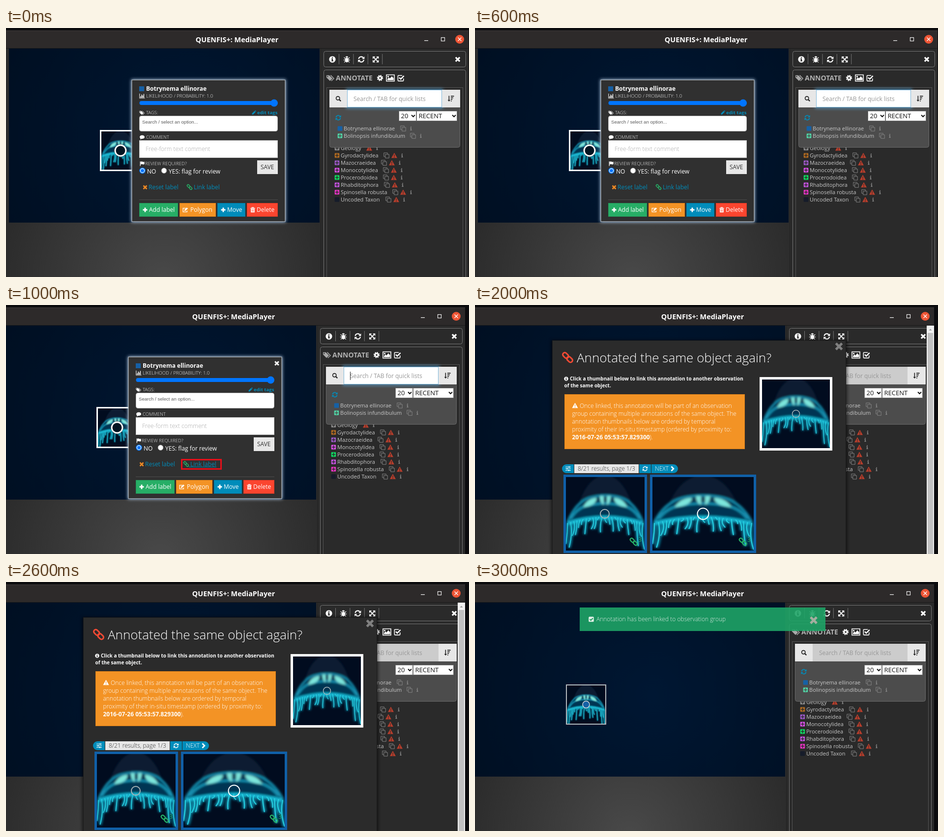
These frames come from a looping animation (942 by 508 pixels, 4000 ms). An HTML page:

```html
<!DOCTYPE html>
<html lang="en">
<head>
<meta charset="utf-8">
<title>Annotation player</title>
<style>
html, body { margin: 0; width: 100%; height: 100%; overflow: hidden; background: #0c0c0e; }
#stage { display: block; width: 942px; height: 508px; font-family: "Open Sans", sans-serif; }
</style>
</head>
<body>
<svg id="stage" viewBox="0 0 942 508">
  <defs>
    <radialGradient id="sea" gradientUnits="userSpaceOnUse" cx="360" cy="230" r="400">
      <stop offset="0" stop-color="#001733"/><stop offset="1" stop-color="#000f22"/>
    </radialGradient>
    <radialGradient id="floor" gradientUnits="userSpaceOnUse" cx="315" cy="515" r="330">
      <stop offset="0" stop-color="#494949"/><stop offset="1" stop-color="#2c2c2c"/>
    </radialGradient>
    <radialGradient id="side" gradientUnits="userSpaceOnUse" r="1" gradientTransform="translate(784 515) scale(212 660)">
      <stop offset="0" stop-color="#454545"/><stop offset="1" stop-color="#2a2a2a"/>
    </radialGradient>
    <filter id="blur" x="-20%" y="-20%" width="140%" height="140%"><feGaussianBlur stdDeviation="3"/></filter>
    <filter id="soft"><feGaussianBlur stdDeviation="1.4"/></filter>
  </defs>
  <g id="win"></g>
</svg>
<script>
const BLUE = '#008cba', GREEN = '#27ae66', ORANGE = '#f39325', SWATCH = '#1660a5', CHIP = '#e7e7e7';

const rect = (x, y, w, h, fill, more = '') =>
  `<rect x="${x}" y="${y}" width="${w}" height="${h}" fill="${fill}" ${more}/>`;
const frame = (x, y, w, h, color, sw = 1, more = '') =>
  rect(x, y, w, h, 'none', `stroke="${color}" stroke-width="${sw}" ${more}`);
const text = (x, y, s, size, fill = '#fff', weight = 400, more = '') =>
  `<text x="${x}" y="${y}" font-size="${size}" fill="${fill}" font-weight="${weight}" ${more}>${s}</text>`;
const path = (d, more = '') => `<path d="${d}" ${more}/>`;
const line = (d, w = 2) => path(d, `fill="none" stroke="currentColor" stroke-width="${w}"`);
const ring = (x, y, r, color, w, fill = 'none') =>
  `<circle cx="${x}" cy="${y}" r="${r}" fill="${fill}" stroke="${color}" stroke-width="${w}"/>`;
const on = (steps, ...parts) => `<g data-on="${steps}">${parts.join('')}</g>`;

// Icons live in a 16 unit box around 0,0
const hole = 'fill-rule="evenodd"';
const icons = {
  info: path('M0-7.5a7.5 7.5 0 1 0 .01 0zM-1.3-5.2h2.6v2.2h-2.6zM-2.2-1.8h3.5v4.7h1v1.8h-4.6v-1.8h1v-2.9h-.9z', hole),
  i: path('M-1.5-7h3v3h-3zM-3-2.5h4.5v7.5h1.5v2h-6v-2h1.5v-5.5h-1.5z'),
  bug: '<ellipse cy="1.5" rx="4" ry="5.5"/><path d="M-3-4.5a3 3 0 0 1 6 0z"/>' +
    line('M-7.5 1.5H7.5M-6.5-4.5L-3-1M6.5-4.5L3-1M-6 7L-3 4M6 7L3 4', 1.5),
  refresh: line('M-6-1A6 6 0 0 1 4.5-4M6 1A6 6 0 0 1-4.5 4', 2.4) + path('M7.5-7v6h-6zM-7.5 7v-6h6z'),
  expand: line('M-5-5L5 5M5-5L-5 5', 2.2) + path('M-7-7h6l-6 6zM7-7h-6l6 6zM-7 7h6l-6-6zM7 7h-6l6-6z'),
  times: line('M-5.5-5.5L5.5 5.5M5.5-5.5L-5.5 5.5', 4.4),
  tags: path('M-8-6h6l7 7-5.5 5.5-7.5-7.5zM-5.5-4.5a1.3 1.3 0 1 0 .01 0z', hole) + line('M1-6L8 1 2.5 6.5', 1.6),
  cog: '<g fill="none" stroke="currentColor"><circle r="4" stroke-width="3.6"/>' +
    '<circle r="6.4" stroke-width="2.6" stroke-dasharray="2.6 2.426"/></g>',
  image: line('M-8-6.5H8V6.5H-8z', 1.6) + path('M-6 4.5V2l3-3 2 2 4-4.5 3.5 4v4zM-4.5-4.5a1.6 1.6 0 1 0 .01 0z'),
  check: line('M6 1v4.5a1.5 1.5 0 0 1-1.5 1.5h-10A1.5 1.5 0 0 1-7 5.5v-10A1.5 1.5 0 0 1-5.5-6H3', 1.8) + line('M-4-1L-.5 2.5 7-5', 2.8),
  checked: '<rect x="-7" y="-7" width="14" height="14" rx="2.5"/><path d="M-4 0L-1 3 4.5-3" fill="none" stroke="#209c62" stroke-width="2.5"/>',
  search: '<circle cx="-1" cy="-1" r="4.8" fill="none" stroke="currentColor" stroke-width="2.2"/>' + line('M2.5 2.5L7 7', 3),
  sort: line('M-4.5-7V5', 2) + path('M-8 3.5h7l-3.5 4z') + line('M0-6H8M0-2H6M0 2H4M0 6H2', 2),
  clone: line('M-3-3H7V7H-3zM-3 3H-7V-7H3V-3', 1.3),
  warn: path('M0-7.5L8 7H-8zM-1-2.5L-.6 2.5H.6L1-2.5zM-1 3.5v2h2v-2z', hole),
  plusbox: path('M-5-7h10q2 0 2 2v10q0 2-2 2h-10q-2 0-2-2v-10q0-2 2-2zM-1.2-5v3.8h-3.8v2.4h3.8v3.8h2.4v-3.8h3.8v-2.4h-3.8v-3.8z', hole),
  box: '<rect x="-7" y="-7" width="14" height="14" rx="2"/>',
  link: '<g transform="rotate(45)" fill="none" stroke="currentColor" stroke-width="2.2">' +
    '<rect x="-9" y="-3" width="9.5" height="6" rx="3"/><rect x="-.5" y="-3" width="9.5" height="6" rx="3"/></g>',
  pencil: path('M-7 7v-4L2-6 6-2-3 7zM3-7l1.5-1q3 1 3.5 3.5L7-3z'),
  bars: line('M-7.5-7V6.5H8', 1.5) + line('M-4 5V1M-1 5V-4M2 5V-1M5 5V-6', 2),
  comment: '<ellipse cy="-1" rx="8" ry="5.8"/><path d="M-5 2l-1.5 5 6-2.5z"/>',
  flag: path('M-7-7h2V8h-2zM-4.5-6q3-2 6 0t6-.5V2q-3 2-6 .5t-6 .5z'),
  plus: line('M0-6.5V6.5M-6.5 0H6.5', 4.2),
  edit: line('M5 2v4H-7V-5H1', 1.8) + path('M-3 3v-3L4-7 7.5-4 0 3z'),
  trash: line('M-7-4.5H7M-2.5-5V-7h5v2', 1.8) + path('M-5.5-3h11V7.5h-11zM-3-1v6.5h1V-1zM-.5-1v6.5h1V-1zM2-1v6.5h1V-1z', hole),
  sliders: line('M-8-5H8M-8 0H8M-8 5H8', 1.5) + line('M3-7v4M-3-2v4M2 3v4', 2.6),
  chevron: line('M-3-6.5L3.5 0-3 6.5', 4)
};
const icon = (name, x, y, size, color = '#fff') =>
  `<g transform="translate(${x} ${y}) scale(${size / 16})" fill="${color}" color="${color}">${icons[name]}</g>`;

// Simplified jellyfish picture; len is the tentacle length
function jelly(x, y, w, h, len) {
  let arms = '';
  for (let i = 0; i < 25; i++) {
    const px = 2 + i * 4, py = 63 - 9 * Math.sin(Math.PI * px / 100);
    const l = len * (.7 + .5 * Math.sin(i * 2.4)) + (i < 3 || i > 21 ? 16 : 0);
    arms += `M${px} ${py}q${3 * Math.sin(i)} ${l / 2} ${px < 50 ? -2 : 2} ${l}`;
  }
  const rim = 'M2 61Q12 34 30 28Q50 22 70 28Q88 34 98 61';
  const stroke = (d, color, width) => path(d, `fill="none" stroke="${color}" stroke-width="${width}"`);
  return `<svg x="${x}" y="${y}" width="${w}" height="${h}" viewBox="0 0 100 100" preserveAspectRatio="none">` +
    rect(0, 0, 100, 100, '#010c1f') + '<g filter="url(#soft)">' +
    path('M14 45Q25 0 50-3Q75 0 86 45z', 'fill="#071a30"') +
    path(rim + 'Q50 48 2 61z', 'fill="#043552"') +
    stroke(rim, '#1490b0', 2.5) +
    stroke('M6 57Q14 42 27 39Q50 33 73 39Q86 42 94 57', '#1290b0', 3) +
    path('M22 41Q27 29 39 28Q39 39 22 41zM78 41Q73 29 61 28Q61 39 78 41zM43 26h5v12q-5-3-5-12zM57 26h-5v12q5-3 5-12z', 'fill="#7de6dc"') +
    stroke(arms, '#0a7f9c', 4) +
    stroke('M2 63Q50 47 98 63', '#18b4d0', 5) + '</g>' +
    stroke(arms, '#25cfe0', 1.1) + '</svg>';
}

function backdrop() {
  return rect(-7, 5, 941, 503, '#2c2c2c') + rect(-7, 5, 941, 37, '#2d2a2a') + rect(-7, 5, 941, 1, '#403d3d') +
    text(463, 29, 'QUENFIS+: MediaPlayer', 14.4, '#fff', 700, 'text-anchor="middle"') +
    rect(844, 25, 8, 1.3, '#eee') + frame(878.5, 19.5, 7, 7, '#eee', 1.2) +
    ring(916, 23, 9, 'none', 0, '#ee5535') + path('M912.5 19.5l7 7m0-7l-7 7', 'stroke="#fff" stroke-width="1.3"') +
    rect(-7, 41, 941, 1, '#191919') +
    rect(-1, 397, 635, 111, 'url(#floor)') + rect(-1, 42, 632, 355, 'url(#sea)') +
    rect(634, 42, 300, 466, 'url(#side)') + rect(633, 42, 1, 466, '#222');
}

const rowIcons = (end, y, warn, clone = true) => {
  let x = end + (clone ? 16 : 0);
  return (clone ? icon('clone', x, y, 12, '#858585') : '') +
    (warn ? icon('warn', x += 16, y, 12, '#b83e2c') : '') + icon('i', x + 16, y, 9, '#858585');
};

function sidePanel() {
  const rows = [['Geology', 716, '#888'], ['Gyrodactylidea', 751, '#b06a20'], ['Mazocraeidea', 746, '#9a58c4'],
    ['Monocotylidea', 750, '#d44fe2'], ['Procerodoidea', 750, '#10da62'], ['Rhabditophora', 752, '#c052da'],
    ['Spinosella robusta', 769, '#e434c0'], ['Uncoded Taxon', 755, '#161c2a']];
  const list = rows.map(([name, end, color], n) => {
    const y = 245 + n * 15;
    return icon(n < 7 ? 'plusbox' : 'box', 666.5, y, 11, color) + text(674, y + 4, name, 11, '#c8c8c8') + rowIcons(end, y, true, n > 0);
  }).join('');
  const select = (x, w, s) => rect(x + .5, 169.5, w - 1, 20, '#fff', 'stroke="#767676"') + text(x + 4.5, 184, s, 13, '#111') +
    path(`M${x + w - 10} 177.5l3.5 3.5 3.5-3.5`, 'fill="none" stroke="#111" stroke-width="2"');
  return frame(639.5, 47.5, 289, 32, '#777', 1, 'rx="4"') + frame(639.5, 85.5, 289, 440, '#777', 1, 'rx="4"') +
    frame(645.5, 121.5, 277, 410, '#555') +
    ['info', 'bug', 'refresh', 'expand'].map((n, k) => icon(n, 657 + k * 29.4, 64, 14) + rect(670 + k * 29.4, 53, 1, 21, '#777')).join('') +
    icon('times', 912, 64, 12) + icon('tags', 652.5, 102, 15, '#aaa') + text(664, 107, 'ANNOTATE', 14, '#b0b0b0', 700) +
    icon('cog', 754, 102, 13) + icon('image', 775, 102, 16) + icon('check', 796.5, 102, 14) + list +
    rect(651.5, 160.5, 265, 83, '#4c4c4c', 'rx="4" stroke="#6a6a6a"') +
    on('01', frame(687, 126, 193, 36, '#58b4f0', 3, 'filter="url(#blur)"')) +
    rect(651, 126, 266, 36, CHIP) +
    on('01', rect(687.5, 126.5, 192, 35, '#fff', 'stroke="#7fb8dc"')) +
    on('23', rect(687, 126, 193, 36, '#ccc')) +
    text(700, 149, 'Search / TAB for quick lists', 12, '#979797') + on('1', rect(700, 136, 1, 17, '#222')) +
    icon('search', 669, 144, 12, '#222') + icon('sort', 898, 144, 13, '#222') +
    icon('refresh', 669, 183, 12, BLUE) + select(792, 36, '20') + select(828, 83, 'RECENT') +
    icon('box', 672.5, 205, 11, SWATCH) + text(680, 209, 'Botrynema ellinorae', 11, '#c8c8c8') + rowIcons(785, 205) +
    icon('plusbox', 672.5, 220, 11, '#50d2a4') + text(680, 224, 'Bolinopsis infundibulum', 11, '#c8c8c8') + rowIcons(805, 220);
}

function marker() {
  return jelly(187, 211, 78, 79, 28) +
    on('01', frame(185.5, 209.5, 80, 81, '#fff', 3), ring(226, 250, 12.5, '#111', 1), ring(226, 250, 11, '#fff', 3, '#031522')) +
    on('23', frame(186, 210, 80, 80, '#b5b9bd', 2), ring(226, 250, 7, '#cfd6dc', 1.5, SWATCH));
}

function popup() {
  const label = (x, y, s) => text(x, y, s, 9.6, '#f2f2f2', 300);
  const button = (x, w, color, name, s, edge) => rect(x + .5, 357.5, w - 1, 27, color, `stroke="${edge}"`) +
    icon(name, x + 12, 371, 11) + text(x + (name === 'edit' ? 22 : 20), 375, s, 12);
  return on('01',
    rect(248, 105, 314, 291, '#bcd4ee', 'filter="url(#blur)"'),
    rect(249, 106, 312, 289, '#303030', 'stroke="#c6ccd2"'),
    on('1', icon('times', 551, 119, 11)),
    rect(264, 119, 10, 10, SWATCH), text(278, 128, 'Botrynema ellinorae', 12, '#fff', 700),
    icon('bars', 270, 138.5, 11), label(278, 142, 'LIKELIHOOD / PROBABILITY: 1.0'),
    rect(264.5, 149, 281, 8, '#0075ff', 'rx="4"'), ring(538.5, 153, 7.5, 'none', 0, '#0075ff'),
    icon('tags', 269.5, 173, 10), label(278, 176, 'TAGS:'),
    icon('pencil', 497.5, 172.5, 9, BLUE), text(504, 176, 'edit tags', 9.6, BLUE, 700),
    rect(264.5, 179.5, 281, 31, '#fff', 'rx="4" stroke="#bbb"'),
    text(270, 195, 'Search / select an option...', 9.6, '#5a5a5a', 400, 'font-family="Liberation Sans, Arial, sans-serif"'),
    icon('comment', 270, 223, 10), label(278, 226, 'COMMENT'),
    rect(264.5, 229.5, 281, 35, '#fff', 'stroke="#ccc"'), text(277, 251, 'Free-form text comment', 12, '#aaa', 300),
    icon('flag', 270, 276.5, 10), label(276, 280, 'REVIEW REQUIRED?'),
    ring(270.5, 291, 5.5, '#0075ff', 1.5, '#fff'), ring(270.5, 291, 3.5, 'none', 0, '#0075ff'),
    text(280, 297, 'NO', 12), ring(314.5, 291, 5.5, '#777', 1, '#fff'), text(324, 297, 'YES: flag for review', 12),
    rect(504, 270, 42, 28, CHIP), text(511, 288, 'SAVE', 12, '#333'),
    icon('times', 276, 325, 10, '#f08a24'), text(283, 329, 'Reset label', 12, BLUE),
    icon('link', 366.5, 324.5, 11, GREEN), text(375, 329, 'Link label', 12, BLUE),
    on('1', rect(372, 330, 56, 1, BLUE), frame(357.5, 315.5, 80, 19, '#e5101a', 3)),
    rect(264, 350, 282, 1, '#4d4d4d'),
    button(264, 79, GREEN, 'plus', 'Add label', '#23985a'), button(346, 74, ORANGE, 'edit', 'Polygon', '#e08218'),
    button(423, 57, BLUE, 'plus', 'Move', '#007ca6'), button(483, 63, '#fb452f', 'trash', 'Delete', '#e03a26'));
}

function dialog() {
  const thumb = (x, w) => rect(x, 346, w, 160, '#1060a8') + jelly(x + 5, 351, w - 10, 150, 18) +
    icon('link', x + w - 27, 483, 16, GREEN) + text(x + w - 18, 483, '3', 12, GREEN);
  const note = ['group containing multiple annotations of the same object. The',
    'annotation thumbnails below are ordered by temporal',
    'proximity of their in-situ timestamp (ordered by proximity to:'];
  return on('2',
    rect(919, 42, 15, 466, '#f1f1f1'), rect(921, 57, 11, 451, '#c1c1c1'), path('M923.5 52h6l-3-3.5z', 'fill="#a0a0a0"'),
    rect(155, 72, 602, 445, '#000', 'opacity=".6" filter="url(#blur)"'),
    rect(157.5, 72.5, 597, 445, '#2b2b2b', 'stroke="#1c1c1c"'),
    icon('times', 740.5, 84.5, 18, '#808080'), icon('link', 188.5, 107, 22, '#f44a34'),
    text(207, 117, 'Annotated the same object again?', 26, '#fff', 300),
    icon('info', 185.5, 150.5, 9), text(193, 154, 'Click a thumbnail below to link this annotation to another observation', 10, '#fff', 700),
    text(181.5, 168, 'of the same object.', 10, '#fff', 700),
    rect(182.5, 182.5, 366, 111, ORANGE, 'stroke="#e08218"'), icon('warn', 203.5, 205, 12),
    text(213, 210, 'Once linked, this annotation will be part of an observation', 12, '#fff', 300),
    ...note.map((s, n) => text(197.5, 226 + n * 16, s, 12, '#fff', 300)),
    text(197.5, 274, '<tspan font-weight="700">2016-07-26 05:53:57.829300</tspan>).', 12, '#fff', 300),
    rect(579, 147, 148, 150, '#fff'), jelly(584, 152, 138, 140, 18), ring(653, 222, 7.5, '#aab4b8', 1.5),
    rect(177, 325, 40, 18, BLUE, 'rx="9"'), rect(370, 325, 43, 18, BLUE, 'rx="9"'), rect(334, 325, 60, 18, BLUE),
    rect(201, 325, 133, 18, CHIP), ...[201, 333, 358].map(x => rect(x, 325, 1, 18, '#2b2b2b')),
    icon('sliders', 189.5, 334, 11), text(209, 338, '8/21 results, page 1/3', 12, '#333', 300),
    icon('refresh', 346, 334, 11), text(366, 338, 'NEXT', 12, '#fff', 300), icon('chevron', 401.5, 334, 11),
    thumb(180, 170), ring(264, 426, 9, '#a9b2b5', 2), thumb(356, 216), ring(464, 426, 11.5, '#fff', 2));
}

const notice = () => on('3',
  rect(213, 52, 500, 48, '#1fa366', 'opacity=".9"'),
  icon('checked', 236.5, 76, 12, '#e0efe6'),
  text(247, 80, 'Annotation has been linked to observation group', 12, '#dcece3', 300),
  icon('times', 689, 78, 18, '#a4ae9f'));

const win = document.getElementById('win');
win.innerHTML = backdrop() + sidePanel() + marker() + popup() + dialog() + notice();
const layers = win.querySelectorAll('[data-on]');

function draw() {
  const step = Math.floor(performance.now() / 1000) % 4;
  win.setAttribute('transform', `translate(${step ? 0 : 7} 0)`);
  for (const g of layers) g.style.display = g.dataset.on.includes(step) ? '' : 'none';
  requestAnimationFrame(draw);
}
draw();
</script>
</body>
</html>
```
